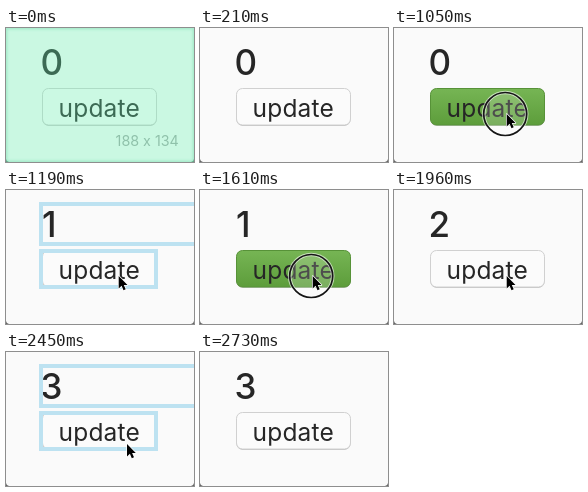
An HTML page for the animation above (2.87 s loop, 188 px wide and 134 px high).

```html
<!DOCTYPE html>
<html lang="en">
<head>
<meta charset="utf-8">
<title>Counter</title>
<style>
  html, body { margin: 0; width: 100%; height: 100%; overflow: hidden; background: #fafafa; }
  svg { display: block; width: 188px; height: 134px; }
  text { font-family: Inter, Roboto, "Liberation Sans", sans-serif; fill: #262626; }
  #count { font-size: 35px; font-weight: 450; }
  #label { font-size: 24.5px; letter-spacing: .2px; }
</style>
</head>
<body>
<svg viewBox="0 0 188 134">
  <defs>
    <linearGradient id="green" x2="0" y2="1">
      <stop offset="0" stop-color="#76b554"/>
      <stop offset="1" stop-color="#5d9d3b"/>
    </linearGradient>
    <filter id="soft" x="-5%" y="-5%" width="110%" height="110%">
      <feGaussianBlur stdDeviation="1.2"/>
    </filter>
  </defs>
  <rect width="188" height="134" fill="#fafafa"/>
  <path d="M0 131Q.4 133.6 3 134H0ZM188 131Q187.6 133.6 185 134H188Z" fill="#666"/>

  <text id="count" y="47"></text>
  <rect x="36.5" y="61.2" width="114" height="36.6" rx="6" fill="#b4b4b4"/>
  <rect id="button" x="36.5" y="60.5" width="114" height="36.5" rx="6"/>
  <text id="label" x="52.5" y="88.5">update</text>

  <g id="marks" fill="none" stroke="#bde2f1" stroke-width="4">
    <rect x="35" y="14" width="170" height="40"/>
    <rect x="35" y="61" width="115" height="36"/>
  </g>

  <g id="ring">
    <circle r="21.5" fill="#fff" fill-opacity=".18" stroke="#fff" stroke-opacity=".6" stroke-width="3.6"/>
    <circle r="21.5" fill="none" stroke="#161616" stroke-width="1.7"/>
  </g>
  <path id="cursor" d="M0 0V12.4L2.9 9.8L4.8 14.3L7 13.3L5.1 9H8.8Z"
        fill="#000" stroke="#fff" stroke-width="1.4" stroke-linejoin="round" paint-order="stroke"/>

  <g id="tint">
    <rect width="188" height="134" fill="#67f2b0" fill-opacity=".33"/>
    <rect width="188" height="134" fill="none" stroke="#5fcf9f" stroke-opacity=".35" stroke-width="3" filter="url(#soft)"/>
    <text x="172.8" y="118" font-size="14.3" text-anchor="end" style="fill:#8fc1aa">188 x 134</text>
  </g>
</svg>
<script>
const LOOP = 2870, STEP = 70;
const clicks = [
  { press: 910, release: 1120, settle: 1330 },
  { press: 1470, release: 1680, settle: 1890 },
  { press: 2240, release: 2450, settle: 2590 }
];
// Pointer stops: time, x, y
const route = [
  [560, 177, 112], [630, 152, 102], [700, 134, 95], [770, 121.7, 89.8],
  [840, 115, 87], [910, 112.7, 86], [2240, 112.7, 86],
  [2380, 113, 91], [2450, 121, 92], [2520, 156, 95], [2590, 200, 95]
];
const el = id => document.getElementById(id);
const [count, button, marks, ring, cursor, tint] =
  ["count", "button", "marks", "ring", "cursor", "tint"].map(el);

const show = (node, on) => node.setAttribute("visibility", on ? "visible" : "hidden");
const move = (node, x, y) => node.setAttribute("transform", `translate(${x} ${y})`);
const within = (t, a, b) => t >= a && t < b;

function pointerAt(t) {
  const i = route.findIndex((stop, k) => k && t < stop[0]);
  if (t < route[0][0] || i < 0) return null;
  const [t0, x0, y0] = route[i - 1], [t1, x1, y1] = route[i];
  const p = (t - t0) / (t1 - t0);
  return [x0 + (x1 - x0) * p, y0 + (y1 - y0) * p];
}

function draw(t) {
  const n = clicks.filter(c => t >= c.release).length;
  count.textContent = n;
  count.setAttribute("x", n === 1 ? 36 : 34.6);

  const pressed = clicks.some(c => within(t, c.press, c.release));
  button.setAttribute("fill", pressed ? "url(#green)" : "#fbfbfb");
  button.setAttribute("stroke", pressed ? "#579238" : "#d0d0d0");

  show(marks, clicks.some(c => within(t, c.release, c.settle)));

  const pos = pointerAt(t);
  show(cursor, pos);
  show(ring, pos && clicks.some(c => within(t, c.press + STEP, c.release)));
  if (pos) {
    move(cursor, ...pos);
    move(ring, pos[0] - 1.5, pos[1]);
  }
  tint.setAttribute("opacity", Math.max(0, 1 - t / 210));
}

const start = performance.now();
function tick() {
  const t = (performance.now() - start) % LOOP;
  draw(Math.floor(t / STEP) * STEP);
  requestAnimationFrame(tick);
}
tick();
</script>
</body>
</html>
```
